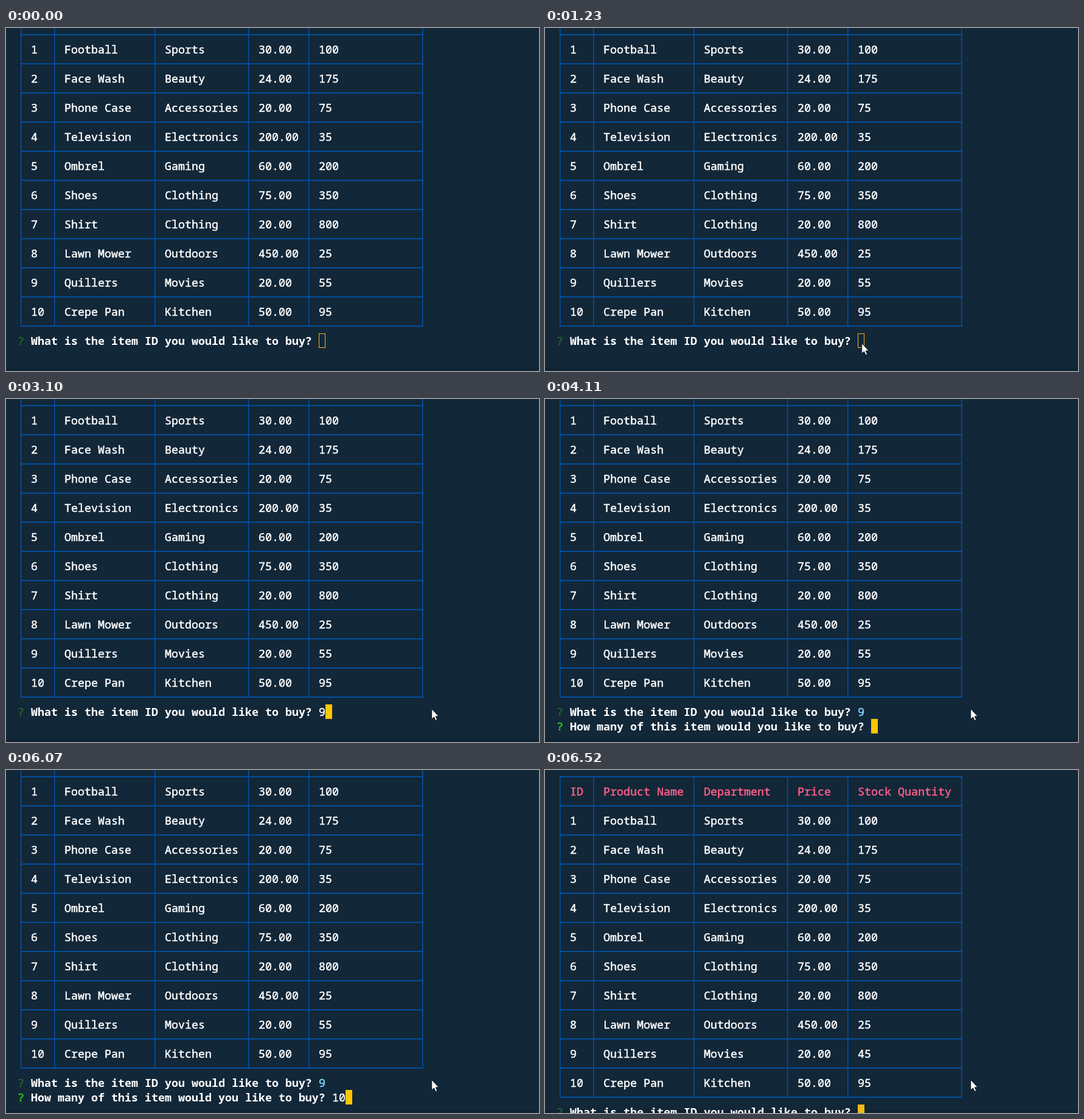
Recreate the animation shown at these times as an HTML page. Size 876 by 565 pixels, loop 8000 ms.

```html
<!DOCTYPE html>
<html lang="en">
<head>
<meta charset="utf-8">
<title>Store terminal</title>
<style>
html, body { margin: 0; width: 100%; height: 100%; overflow: hidden; background: #122738; }
svg { display: block; }
text { font: 500 18.333px "Noto Sans Mono", "DejaVu Sans Mono", monospace; white-space: pre;
  fill: currentColor; stroke: currentColor; stroke-width: .5px; }
.b { font-weight: 700; stroke: none; }
</style>
</head>
<body>
<svg id="stage" width="876" height="565" viewBox="0 0 876 565"></svg>
<script>
const LOOP = 8000, CW = 11, CH = 24, LEFT = 19;
const WHITE = '#fff', PINK = '#ff5f88', BLUE = '#0053aa', GOLD = '#ffc600',
      GREEN = '#35cf1c', DIM = '#23662a', CYAN = '#84d9ff';
const edges = [0, 5, 20, 34, 43, 60];
const head = ['ID', 'Product Name', 'Department', 'Price', 'Stock Quantity'];
const items = `Football,Sports,30.00,100
Face Wash,Beauty,24.00,175
Phone Case,Accessories,20.00,75
Television,Electronics,200.00,35
Ombrel,Gaming,60.00,200
Shoes,Clothing,75.00,350
Shirt,Clothing,20.00,800
Lawn Mower,Outdoors,450.00,25
Quillers,Movies,20.00,55
Crepe Pan,Kitchen,50.00,95`.split('\n').map((s, i) => [String(i + 1), ...s.split(',')]);
const ask1 = 'What is the item ID you would like to buy?';
const ask2 = 'How many of this item would you like to buy?';

const rect = (x, y, w, h, fill) => `<rect x="${x}" y="${y}" width="${w}" height="${h}" fill="${fill}"/>`;
const text = (col, top, s, color = WHITE, cls = '') =>
  `<text x="${LEFT + col * CW}" y="${top + 19}" color="${color}" class="${cls}">${s}</text>`;
const block = (col, top, fill = GOLD) => rect(LEFT + col * CW, top, CW, CH, fill);
const ask = (top, s, mark) => text(0, top, '?', mark) + text(2, top, s, WHITE, 'b');

// Table whose header text cell starts at y = top
function table(top, stock9) {
  const y0 = top - 12.9, height = 11 * 48 + 1.8;
  let out = '';
  for (let i = 0; i < 12; i++) out += rect(24, y0 + i * 48, 661.5, 1.8, BLUE);
  for (const e of edges) out += rect(LEFT + e * CW + 5, y0, 1.5, height, BLUE);
  [head, ...items].forEach((row, r) => row.forEach((cell, c) => {
    const s = r === 9 && c === 4 ? stock9 : cell;
    out += text(edges[c] + 2, top + r * 48, s, r ? WHITE : PINK);
  }));
  return out;
}

function terminal(t) {
  if (t >= 6520) return table(23, '45') + ask(551, ask1, DIM) + block(45, 551, '#efba12');
  if (t >= 6440) return table(-97, '55') +
    ask(431, ask1, GREEN) + text(45, 431, '9', CYAN) +
    ask(455, ask2, GREEN) + text(47, 455, '10', CYAN) +
    text(0, 479, '9', GOLD) +
    text(0, 503, 'Your total for (10) - Quillers is: 200') + block(0, 527);
  const out = table(-25, '55') + ask(503, ask1, DIM);
  if (t >= 4110) {
    const typed = t < 5830 ? '' : t < 6070 ? '1' : '10';
    return out + text(45, 503, '9', CYAN) + ask(527, ask2, GREEN) +
      text(47, 527, typed) + block(47 + typed.length, 527);
  }
  if (t >= 3100) return out + text(45, 503, '9') + block(46, 503);
  if (t >= 1550) return out + block(45, 503);
  return out + '<rect x="514.5" y="503.5" width="10" height="23" fill="none" stroke="#f5b622"/>';
}

// The pointer is sampled in even steps, as a screen recorder does
function glide(t, start, step, last, from, to) {
  const k = Math.min(last, Math.floor((t - start) / step)) / last;
  const e = k * (2 - k);
  return from.map((v, i) => Math.round(v + (to[i] - v) * e));
}
function pointer(t) {
  if (t < 290) return '';
  const [x, y] = t < 1150 ? glide(t, 290, 80, 10, [660, 541], [526, 522])
    : t < 1230 ? [523, 521]
    : t < 1790 ? [521, 520]
    : glide(t, 1712, 78, 6, [521, 520], [700, 511]);
  const click = t >= 1470 && t < 1550
    ? '<circle cx="521" cy="519.5" r="15" fill="#ff0" fill-opacity=".47"/>' : '';
  return click + `<path transform="translate(${x} ${y})" fill="#fff" stroke="#0a121a" stroke-width=".9"
    d="M-.3 -.5V16.3L3.5 12.8 6 18.6 8.7 17.5 6.2 11.8H11.2Z"/>`;
}

const stage = document.getElementById('stage');
let shown = '', begin;
function frame(now) {
  begin ??= now;
  const t = (now - begin) % LOOP;
  const next = rect(0, 0, 876, 565, '#122738') + rect(0, 560, 876, 5, '#102334') + terminal(t) + pointer(t);
  if (next !== shown) stage.innerHTML = shown = next;
  requestAnimationFrame(frame);
}
requestAnimationFrame(frame);
</script>
</body>
</html>
```
